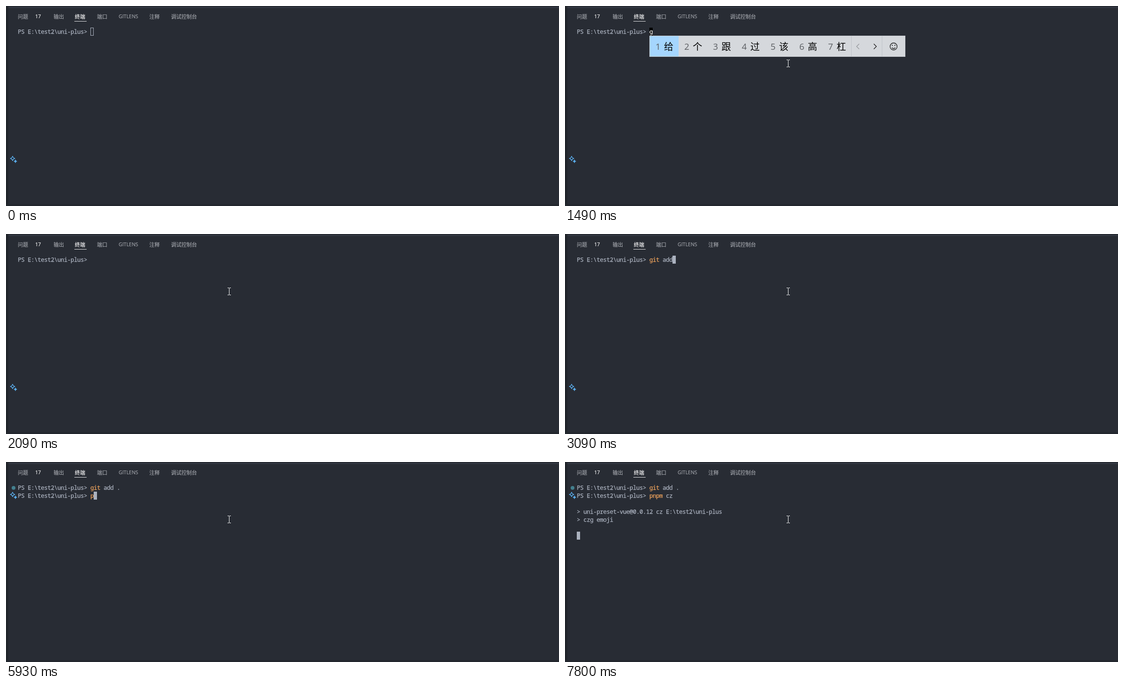
These frames come from a looping animation (1173 px wide and 425 px high, 8000 ms). An HTML page:

```html
<!DOCTYPE html>
<html lang="zh">
<head>
<meta charset="utf-8">
<title>Terminal</title>
<style>
html, body { margin: 0; width: 100%; height: 100%; overflow: hidden; background: #282c34; }
#stage { position: relative; width: 1173px; height: 425px; overflow: hidden; background: #282c34; }
#stage > * { position: absolute; }
.side { left: 0; top: 0; width: 5px; height: 425px; background: #21252b; }
.top { left: 5px; top: 3px; width: 1168px; height: 1px; background: #3e4452; }
.foot { left: 0; top: 421px; width: 1173px; height: 4px; background: #23272e; }
.tab { top: 14px; font: 11px/16px "Noto Sans CJK SC", "Noto Sans CJK", sans-serif; color: #a3a6ac; white-space: pre; -webkit-text-stroke: .15px; }
.latin { font: 10.5px/16px "Open Sans", sans-serif; }
.on { color: #fff; }
.line { left: 145px; top: 32px; width: 26px; height: 1px; background: #e3e4e6; }
.row { left: 25px; height: 17px; font: 12.5px/17px "Noto Sans Mono", monospace; color: #abb2bf; white-space: pre; -webkit-text-stroke: .25px; }
.row b { font-weight: 400; color: #f0a45d; }
.row i { font-style: normal; display: inline-block; height: 17px; background: #000; color: #fff; }
#caret { width: 7px; height: 17px; box-sizing: border-box; border: 1px solid #abb2bf; }
#dot { left: 11.5px; top: 50.5px; width: 8px; height: 8px; border-radius: 50%; background: #43808f; }
#spark { left: 8px; width: 16px; height: 16px; }
#ime { left: 179px; top: 63px; height: 45px; box-sizing: border-box; border: 1px solid #c3c7cc; background: #d5d8dc; display: flex; color: #000; }
#list { display: flex; }
.pick { padding: 0 11px 0 12px; display: flex; white-space: pre; font: 20px/43px "Noto Sans CJK SC", "Noto Sans CJK", sans-serif; }
.pick span { width: 18px; font: 18.5px/43px "Open Sans", sans-serif; color: #5a5d61; }
.pick:first-child { background: #a5d6fe; }
#beam { left: 0; top: 0; width: 9px; height: 16px; }
</style>
</head>
<body>
<div id="stage">
  <div class="side"></div><div class="top"></div><div class="foot"></div>
  <div class="tab" style="left:25px">问题</div>
  <div class="tab latin on" style="left:62px">17</div>
  <div class="tab" style="left:101px">输出</div>
  <div class="tab on" style="left:146px">终端</div>
  <div class="line"></div>
  <div class="tab" style="left:193px">端口</div>
  <div class="tab latin" style="left:239px">GITLENS</div>
  <div class="tab" style="left:304px">注释</div>
  <div class="tab" style="left:350px">调试控制台</div>
  <div id="caret"></div>
  <div id="dot"></div>
  <svg id="spark" viewBox="0 0 16 16">
    <path d="M6 1.2Q7 5 10.8 6Q7 7 6 10.8Q5 7 1.2 6Q5 5 6 1.2Z" fill="none" stroke="#5cb0f0" stroke-width="1.3" stroke-linejoin="round"/>
    <path d="M12 8.6Q12.6 11.4 15.4 12Q12.6 12.6 12 15.4Q11.4 12.6 8.6 12Q11.4 11.4 12 8.6Z" fill="#5cb0f0" stroke="#5cb0f0" stroke-width=".6"/>
  </svg>
  <div id="ime">
    <div id="list"></div>
    <svg width="114" height="43" fill="none" stroke="#1c1c1c" stroke-width="1.3">
      <path d="M.5 0V43M65.5 0V43" stroke="#bfc3c8" stroke-width="1"/>
      <path d="M17 16.5L11.5 22L17 27.5" stroke="#96999d"/>
      <path d="M48 16.5L53.5 22L48 27.5"/>
      <circle cx="90" cy="22" r="7.5"/>
      <path d="M86.3 24.5Q90 28.5 93.7 24.5"/>
      <path d="M87.3 18.5V20.7M92.7 18.5V20.7" stroke-width="1.7"/>
    </svg>
  </div>
  <svg id="beam" viewBox="0 0 9 16">
    <path d="M1 .5H4M5 .5H8M4.5 1V15M1 15.5H4M5 15.5H8" fill="none" stroke="#fff"/>
  </svg>
</div>
<script>
const LOOP = 8000, CELL = 7, ROW = 17, LEFT = 25, TOP = 46;
const PROMPT = 'PS E:\\test2\\uni-plus> ';
const P = PROMPT.length;
const $ = id => document.getElementById(id);
const prompt = (cmd = '', rest = '') => PROMPT.replace('>', '&gt;') + `<b>${cmd}</b>${rest}`;
const compose = s => prompt() + `<i>${s}</i>`;

// Each step overrides the state before it; caret is [column, row].
const steps = [[0, { rows: [prompt()], caret: [P, 0], fill: false, ime: '', dot: false, spark: 16 }]];
const step = (time, change) => steps.push([time, { ...steps.at(-1)[1], ...change }]);
const type = (time, row, cmd, rest = '') => step(time, {
  rows: [...steps.at(-1)[1].rows.slice(0, row), prompt(cmd, rest)],
  caret: [P + cmd.length + rest.length, row]
});

step(750, { fill: true });
step(1490, { rows: [compose('g')], caret: null, ime: '给 个 跟 过 该 高 杠' });
step(1630, { rows: [compose('gi')], ime: 'gi 给 个 跟 过 该 高' });
step(1690, { rows: [compose('git')] });
step(1760, { ime: 'git 给他 Git 个 跟 过 该' });
step(2090, { rows: [prompt()], ime: '' });
type(2160, 0, 'git');
type(2230, 0, 'git', ' ');
type(2690, 0, 'git', ' a');
type(2890, 0, 'git', ' ad');
type(3090, 0, 'git', ' add');
type(3350, 0, 'git', ' add ');
type(3550, 0, 'git', ' add .');
step(4140, { caret: [0, 1] });
type(4210, 1, '');
step(4280, { dot: true, spark: 1 });
type(5930, 1, 'p');
type(6070, 1, 'pn');
type(6210, 1, 'pnp');
type(6410, 1, 'pnpm');
type(6540, 1, 'pnpm', ' ');
type(6940, 1, 'pnpm', ' c');
type(7070, 1, 'pnpm', ' cz');
step(7270, { caret: [0, 2] });
step(7800, {
  rows: [...steps.at(-1)[1].rows, '', '&gt; uni-preset-vue@0.0.12 cz E:\\test2\\uni-plus', '&gt; czg emoji'],
  caret: [0, 6]
});

const lines = Array.from({ length: 5 }, (_, i) => {
  const el = document.createElement('div');
  el.className = 'row';
  el.style.top = TOP + i * ROW + 'px';
  $('stage').insertBefore(el, $('caret'));
  return el;
});

// Bring the font's advance to the terminal's cell width.
lines[0].textContent = PROMPT;
const spacing = CELL - lines[0].getBoundingClientRect().width / P;
lines.forEach(el => { el.style.letterSpacing = spacing + 'px'; });

const show = (el, on) => { el.style.visibility = on ? 'visible' : 'hidden'; };

let shown;
function draw(state) {
  if (state === shown) return;
  shown = state;
  lines.forEach((el, i) => { el.innerHTML = state.rows[i] || ''; });
  const caret = $('caret');
  show(caret, state.caret);
  if (state.caret) {
    caret.style.left = LEFT + state.caret[0] * CELL + 'px';
    caret.style.top = TOP + state.caret[1] * ROW + 'px';
  }
  caret.style.background = state.fill ? '#abb2bf' : 'none';
  show($('dot'), state.dot);
  $('spark').style.top = TOP + state.spark * ROW + 'px';
  show($('ime'), state.ime);
  $('list').innerHTML = state.ime.split(' ')
    .map((word, i) => `<div class="pick"><span>${i + 1}</span>${word}</div>`).join('');
}

// The pointer glides in ten discrete hops, slowing down.
function movePointer(t) {
  show($('beam'), t >= 70);
  const k = Math.min(9, Math.max(0, Math.floor((t - 70) / 68))) / 9;
  const left = (1 - k) ** 2;
  const x = Math.round(469 + 570 * left), y = Math.round(114 + 273 * left);
  $('beam').style.transform = `translate(${x}px, ${y}px)`;
}

const start = performance.now();
function frame() {
  const t = (performance.now() - start) % LOOP;
  draw(steps.findLast(s => s[0] <= t)[1]);
  movePointer(t);
  requestAnimationFrame(frame);
}
frame();
</script>
</body>
</html>
```
